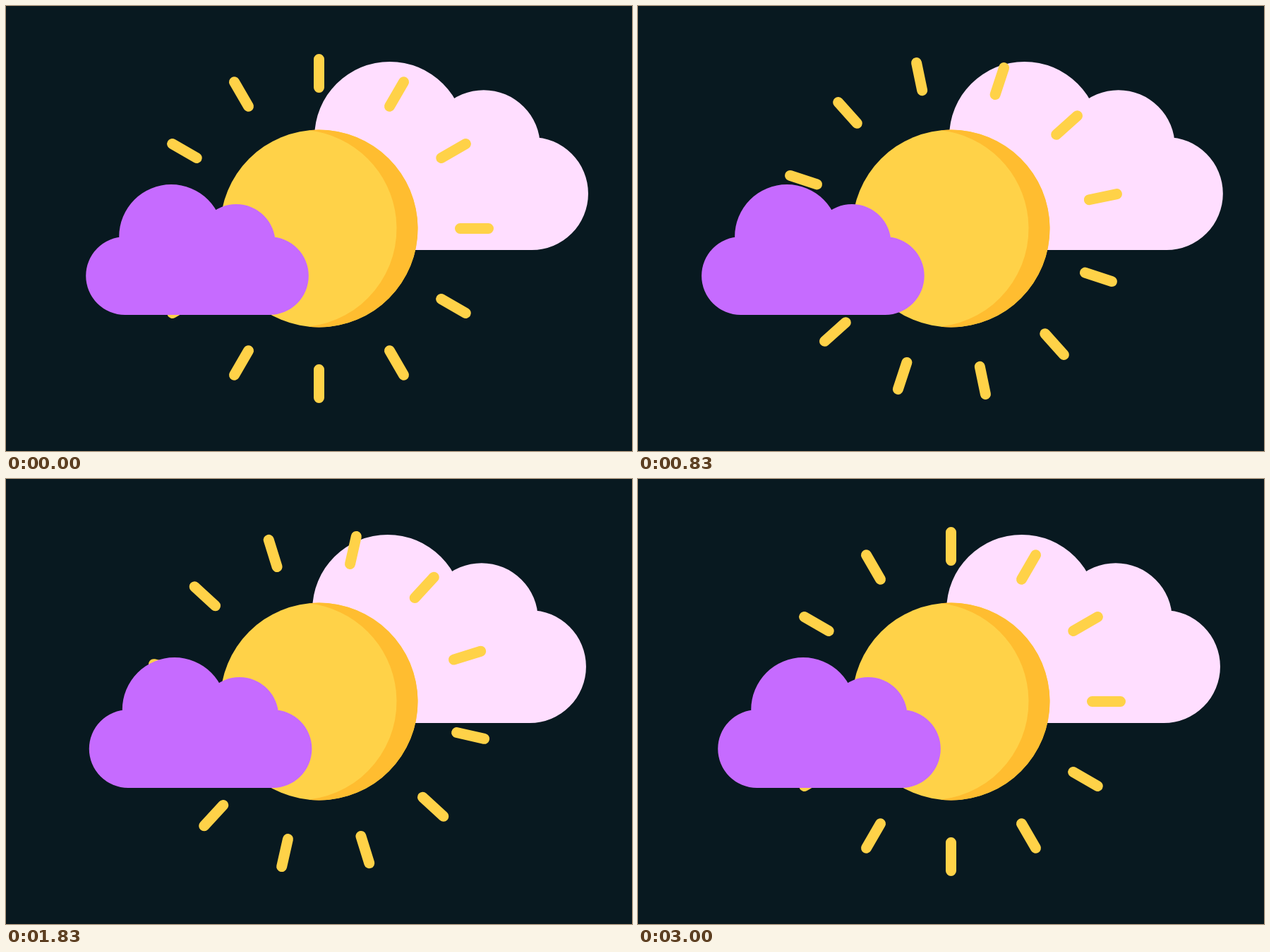
These frames come from a looping animation (887x631 px, 4.04 s). An HTML page with a canvas:

```html
<!DOCTYPE html>
<html lang="en">
<head>
<meta charset="utf-8">
<title>Sun and clouds</title>
<style>
  html, body { margin: 0; width: 100%; height: 100%; overflow: hidden; background: #081920; }
  canvas { display: block; }
</style>
</head>
<body>
<canvas id="stage" width="887" height="631"></canvas>
<script>
const ctx = document.getElementById('stage').getContext('2d');
const W = 887, H = 631, TAU = Math.PI * 2;
const LOOP = 4040, RUN = 3000, STEP = 1000 / 24;
const SUN = { x: 443.5, y: 315.5, r: 140, shade: 30 };
const COLOR = { sky: '#081920', back: '#ffdeff', front: '#c66bff', sun: '#ffd248', shade: '#ffbd30' };

// Keyframes as [ms, value]
const backDrift = [[0, 0], [1500, 6.5], [2000, -5.9], [3000, 0]];
const frontDrift = [[0, 0], [1000, -24.5], [2000, 6.3], [3000, 0]];
const rayTurn = [[0, 0], [2000, -200], [3000, -180]];

// Same curve as cubic-bezier(.42, 0, .58, 1)
function easeInOut(x) {
  let lo = 0, hi = 1;
  for (let i = 0; i < 30; i++) {
    const s = (lo + hi) / 2, q = 1 - s;
    if (1.26 * s * q * q + 1.74 * s * s * q + s * s * s < x) lo = s;
    else hi = s;
  }
  return lo * lo * (3 - 2 * lo);
}

function valueAt(keys, t) {
  for (let i = 1; i < keys.length; i++) {
    const [t0, a] = keys[i - 1], [t1, b] = keys[i];
    if (t < t1) return a + (b - a) * easeInOut((t - t0) / (t1 - t0));
  }
  return keys[keys.length - 1][1];
}

// x, y: centre of the left lobe; r: its radius
function cloud(x, y, r, color) {
  const lobes = [[0, 0, 1], [1.182, -1.005, 1.333], [2.846, -0.835, 1], [3.697, 0, 1]];
  ctx.beginPath();
  for (const [dx, dy, size] of lobes) {
    const cx = x + dx * r, cy = y + dy * r;
    ctx.moveTo(cx + size * r, cy);
    ctx.arc(cx, cy, size * r, 0, TAU);
  }
  ctx.rect(x, y - r, 3.697 * r, 2 * r);
  ctx.fillStyle = color;
  ctx.fill();
}

function rays(degrees) {
  ctx.save();
  ctx.translate(SUN.x, SUN.y);
  ctx.rotate(degrees * TAU / 360);
  ctx.beginPath();
  for (let i = 0; i < 12; i++) {
    const c = Math.cos(i * TAU / 12), s = Math.sin(i * TAU / 12);
    ctx.moveTo(200 * c, 200 * s);
    ctx.lineTo(240 * c, 240 * s);
  }
  ctx.lineWidth = 15;
  ctx.lineCap = 'round';
  ctx.strokeStyle = COLOR.sun;
  ctx.stroke();
  ctx.restore();
}

function sun() {
  const { x, y, r, shade } = SUN;
  ctx.beginPath();
  ctx.arc(x, y, r, 0, TAU);
  ctx.fillStyle = COLOR.sun;
  ctx.fill();

  const outer = Math.acos(-shade / 2 / r), inner = Math.PI - outer;
  ctx.beginPath();
  ctx.arc(x, y, r, -outer, outer);
  ctx.arc(x - shade, y, r, inner, -inner, true);
  ctx.closePath();
  ctx.fillStyle = COLOR.shade;
  ctx.fill();
}

function draw(t) {
  ctx.fillStyle = COLOR.sky;
  ctx.fillRect(0, 0, W, H);
  cloud(449.2 + valueAt(backDrift, t), 266, 80, COLOR.back);
  rays(valueAt(rayTurn, t));
  sun();
  cloud(168.6 + valueAt(frontDrift, t), 382.6, 55.4, COLOR.front);
}

const start = performance.now();
function tick() {
  const t = (performance.now() - start) % LOOP;
  // Motion is stepped at 24 pictures per second
  draw(Math.min(RUN, Math.floor((t + 5) / STEP) * STEP));
  requestAnimationFrame(tick);
}
tick();
</script>
</body>
</html>
```
